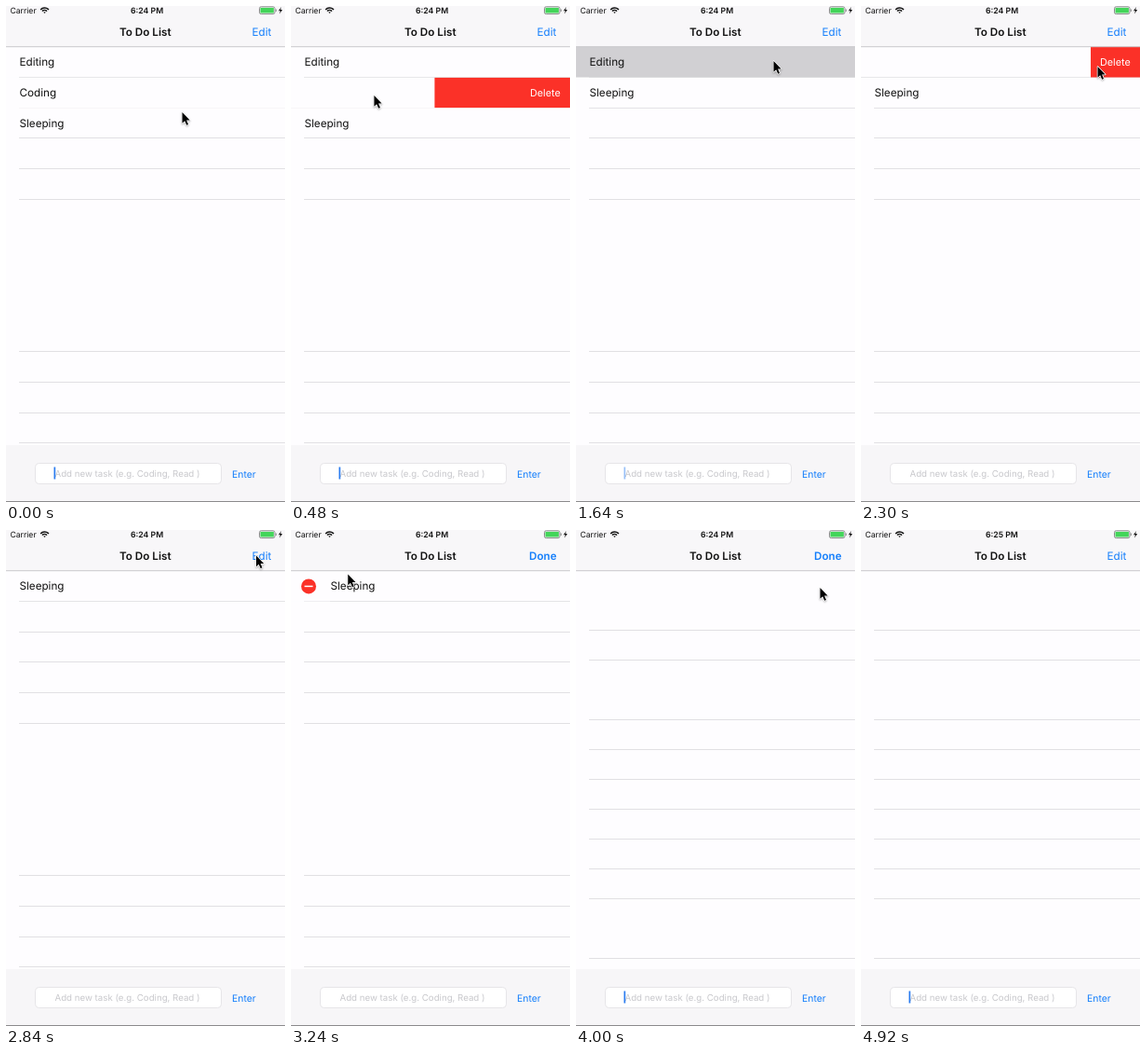
These frames come from a looping animation (300x532 px, 5000 ms). An HTML page with a canvas:

```html
<!DOCTYPE html>
<html>
<head>
<meta charset="utf-8">
<title>To Do List</title>
<style>
html, body { margin: 0; width: 100%; height: 100%; overflow: hidden; background: #fefdff; }
canvas { display: block; width: 300px; height: 532px; }
</style>
</head>
<body>
<canvas id="stage"></canvas>
<script>
const W = 300, H = 532, LOOP = 5000;
const TOP = 43.4, ROW = 32.68, EMPTY_ROW = 32, ACTION = 53, INDENT = 28;
const INK = '#111', BLUE = '#147efb', RED = '#fb3128', GREY = '#8b8a8c';
const PAPER = '#fefdff', BAR = '#f7f6f8', LINE = '#e1e0e3';
const BODY = 11.7, SMALL = 8.7;

// When each gesture starts, in ms
const AT = { swipe: 260, peek: 1720, remove: 2340, edit: 2880, minus: 3320, confirm: 3760, done: 4400 };
const TRAVEL = 260;

const canvas = document.getElementById('stage');
const ratio = window.devicePixelRatio || 1;
canvas.width = W * ratio;
canvas.height = H * ratio;
const ctx = canvas.getContext('2d');
ctx.scale(ratio, ratio);
ctx.textRendering = 'geometricPrecision';

const mix = (a, b, k) => a + (b - a) * k;
function ease(t, start, span) {
  const k = Math.max(0, Math.min(1, (t - start) / span));
  return k * k * (3 - 2 * k);
}

function rect(x, y, w, h, color) {
  ctx.fillStyle = color;
  ctx.fillRect(x, y, w, h);
}

function text(str, x, y, size, color, weight = 400) {
  ctx.font = `${weight} ${size}px Inter, Roboto, sans-serif`;
  ctx.fillStyle = color;
  ctx.fillText(str, x, y);
}

function rule(y, x = 14) {
  rect(x, Math.round(y), W - x, 1, LINE);
}

function roundBox(x, y, w, h, r, color) {
  ctx.beginPath();
  ctx.roundRect(x, y, w, h, r);
  ctx.strokeStyle = color;
  ctx.lineWidth = 1;
  ctx.stroke();
}

// Places the pointer reaches, each after the same travel time
const START = { x: 189.5, y: 114 };
const STOPS = [
  { by: AT.swipe, x: 235, y: 96 },
  { by: AT.swipe + TRAVEL, x: 80, y: 96 },
  { by: 900, x: 135.5, y: 114 },
  { by: AT.peek - 180, x: 212.5, y: 59 },
  { by: AT.peek + TRAVEL, x: 150, y: 60 },
  { by: AT.remove - 60, x: 254.5, y: 65 },
  { by: AT.edit, x: 270, y: 25 },
  { by: AT.minus - 12, x: 20, y: 52 },
  { by: AT.confirm, x: 262.5, y: 62 },
  { by: AT.done - 80, x: 271, y: 26 },
  { by: AT.done + TRAVEL, x: W + 3, y: 60 }
];

function pointerAt(t) {
  return STOPS.reduce((p, stop) => {
    const k = ease(t, stop.by - TRAVEL, TRAVEL);
    return { x: mix(p.x, stop.x, k), y: mix(p.y, stop.y, k) };
  }, START);
}

const ARROW = new Path2D('M0 0V11.8L2.7 9.3 4.7 13.7 6.5 12.9 4.6 8.5H8.2Z');
const BOLT = new Path2D('M296 1L293 5.3H295L294 8.6 297.2 4.1H295.2Z');

function drawPointer(t) {
  if (t >= AT.done + TRAVEL) return;
  const { x, y } = pointerAt(t);
  ctx.save();
  ctx.translate(x, y);
  ctx.lineJoin = 'round';
  ctx.shadowColor = 'rgba(0,0,0,.3)';
  ctx.shadowBlur = 2 * ratio;
  ctx.shadowOffsetY = ratio;
  ctx.lineWidth = 1.5;
  ctx.strokeStyle = '#fff';
  ctx.stroke(ARROW);
  ctx.shadowColor = 'transparent';
  ctx.fillStyle = '#000';
  ctx.fill(ARROW);
  ctx.restore();
}

function drawBadge(x, y, turn) {
  ctx.save();
  ctx.translate(x, y);
  ctx.rotate(turn * Math.PI / 2);
  ctx.fillStyle = RED;
  ctx.beginPath();
  ctx.arc(0, 0, 8, 0, 7);
  ctx.fill();
  rect(-4.5, -0.75, 9, 1.5, '#fff');
  ctx.restore();
}

// open: width of the red action; edit: 0..1 indent; turn: badge rotation
function drawRow(name, y, { height, open = 0, edit = 0, turn = 0, press = 0 }) {
  if (height < 0.5) return;
  const left = 14 + INDENT * edit;
  ctx.save();
  ctx.beginPath();
  ctx.rect(0, y, W, height + 0.6);
  ctx.clip();
  rect(0, y, W, height + 0.6, PAPER);
  rule(y + height, Math.max(0, left - open));
  rect(0, y, W, height + 0.6, `rgba(209,208,211,${press})`);
  text(name, left + 0.5 - open, y + 21, BODY, INK);
  if (edit > 0) drawBadge(19 - INDENT * (1 - edit) - open, y + 17, turn);
  if (open > 0) {
    const edge = W - open;
    rect(edge, y, open, height + 0.6, RED);
    text('Delete', open > W / 2 ? edge + 10 : Math.max(257, edge + 10), y + 20.5, 10.8, '#fff');
  }
  ctx.restore();
}

// Row slides open to "width", waits, then clears the stage from "commit" on
function opening(t, start, width, commit) {
  return width * ease(t, start, TRAVEL) + (W - width) * ease(t, commit, 120);
}

function pressed(t, down, up) {
  return ease(t, down, 40) - ease(t, up, 50);
}

function drawList(t) {
  rect(0, 43, W, 429, PAPER);
  const emptied = t >= AT.confirm + 200;
  for (let n = 1; n <= 13; n++) {
    if (emptied) {
      if (n > 1 && n % 8 !== 4) rule(43 + n * EMPTY_ROW);
    } else if (n <= 5 || n >= 10) {
      rule(TOP + n * ROW);
    }
  }
  if (emptied) return;

  const swiped = AT.swipe + TRAVEL;
  const shrink = start => ROW * (1 - ease(t, start, 160));
  const editing = shrink(AT.remove + 100);
  const coding = shrink(swiped + 120);

  drawRow('Sleeping', TOP + editing + coding, {
    height: shrink(AT.confirm + 80),
    edit: ease(t, AT.edit, 160),
    turn: ease(t, AT.minus, 80),
    open: opening(t, AT.minus, ACTION, AT.confirm)
  });
  drawRow('Coding', TOP + editing, {
    height: coding,
    press: pressed(t, AT.swipe - 50, AT.swipe),
    open: opening(t, AT.swipe, 155, swiped)
  });
  drawRow('Editing', TOP, {
    height: editing,
    press: pressed(t, AT.peek - 150, AT.peek),
    open: opening(t, AT.peek, ACTION, AT.remove)
  });
}

function drawStatus(t) {
  text('Carrier', 4.5, 8, 8.6, INK);
  text(t < 4200 ? '6:24 PM' : '6:25 PM', 134, 8, SMALL, INK, 600);

  ctx.strokeStyle = INK;
  ctx.lineWidth = 1.5;
  for (let r = 1; r < 7; r += 2.5) {
    ctx.beginPath();
    ctx.arc(41.5, 8, r, -Math.PI * 0.76, -Math.PI * 0.24);
    ctx.stroke();
  }

  roundBox(272.5, 0.8, 16.5, 7.8, 1.8, GREY);
  rect(273.5, 1.9, 14.4, 5.6, '#43d559');
  rect(289.8, 3.4, 1, 2.6, GREY);
  ctx.fillStyle = INK;
  ctx.fill(BOLT);
}

function drawHeader(t) {
  rect(0, 0, W, 43, '#f8f7f9');
  rect(0, 43.2, W, 1, '#c9c8cb');
  drawStatus(t);
  text('To Do List', 122, 32, BODY, INK, 600);
  if (t >= AT.edit && t < AT.done) text('Done', 256, 32, BODY, BLUE, 600);
  else text('Edit', 264.5, 32, BODY, BLUE);
}

function drawFooter(t) {
  rect(0, 471, W, 61, BAR);
  rect(32, 491, 199, 21, '#fff');
  roundBox(31.5, 490.5, 200, 22, 4, '#e6e5e8');
  text('Add new task (e.g. Coding, Read )', 52.5, 505, 9.7, '#c8c8cc');
  text('Enter', 243, 505.5, 10.4, BLUE);

  const beat = t % 500;
  ctx.globalAlpha = 1 - ease(beat, 100, 80) + ease(beat, 350, 60);
  rect(51.5, 494.5, 1.7, 13, '#2b7cf0');
  ctx.globalAlpha = 1;
  rect(0, 531, W, 1, GREY);
}

function draw(t) {
  drawList(t);
  drawHeader(t);
  drawFooter(t);
  drawPointer(t);
}

const start = performance.now();
function tick() {
  draw((performance.now() - start) % LOOP);
  requestAnimationFrame(tick);
}
draw(0);
requestAnimationFrame(tick);
</script>
</body>
</html>
```
